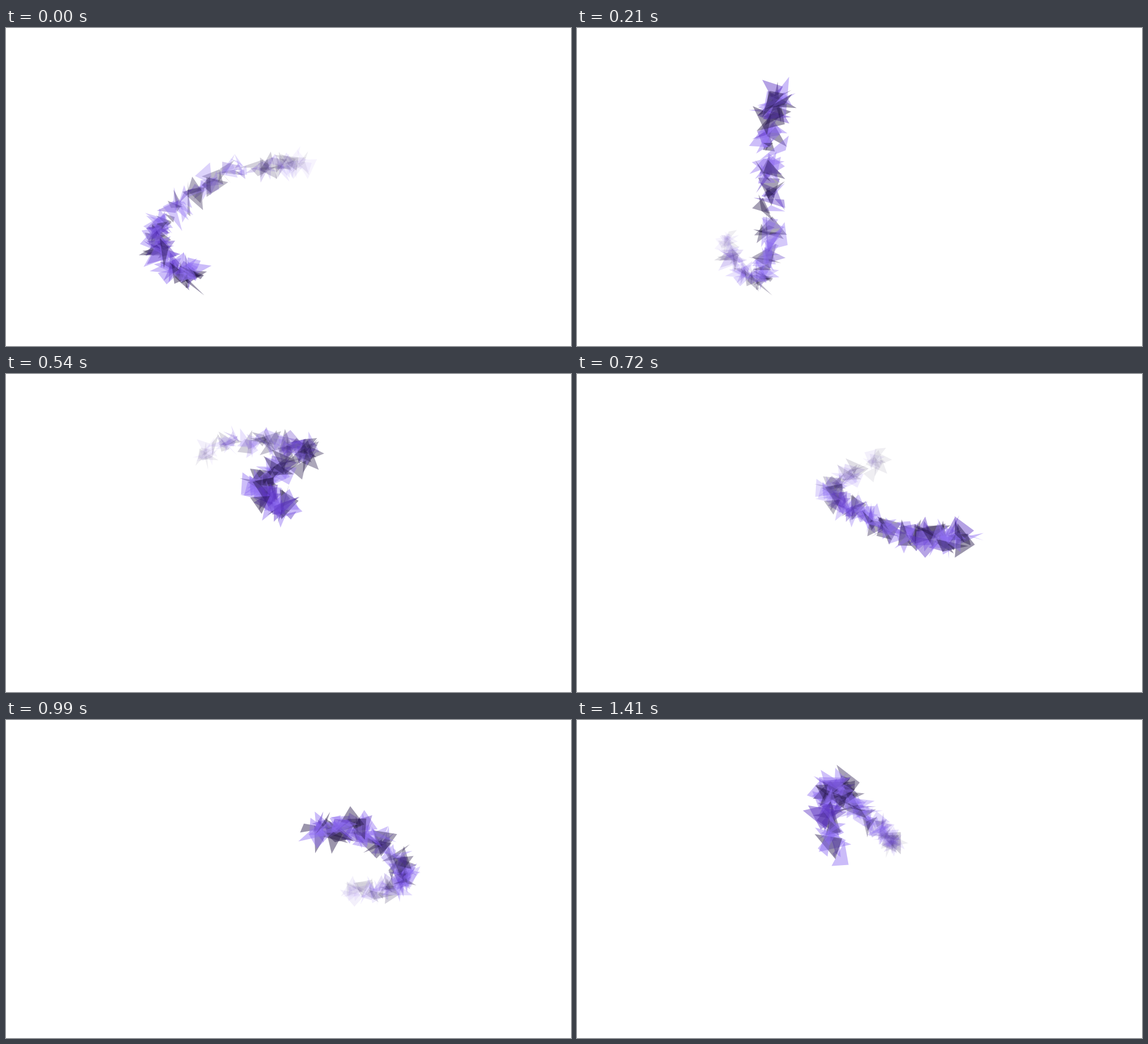
Write an HTML page with a canvas that moves like this. It is 998 px wide and 561 px high and loops after 1.44 s.

```html
<!DOCTYPE html>
<html lang="en">
<head>
<meta charset="utf-8">
<title>Shard trail</title>
<style>
  html, body { margin: 0; width: 100%; height: 100%; overflow: hidden; background: #fff; }
  canvas { display: block; width: 998px; height: 561px; }
</style>
</head>
<body>
<canvas id="stage" width="998" height="561"></canvas>
<script>
const ctx = document.getElementById('stage').getContext('2d');
const STEP = 30, STEPS = 48, LIFE = 12;
const SHARDS = 12, GRAVITY = 0.00027, SHRINK = 0.00095, OPACITY = 0.46;
const LIGHT = '143,110,242', DEEP = '92,52,196', DARK = '38,24,74';

// Emitter path as [step, x, y]; negative steps fill the trail before the loop starts.
const keys = [
  [-12, 530, 222], [-10, 482, 232], [-8, 385, 252], [-5, 272, 343], [-3, 276, 402],
  [0, 335, 429], [4, 338, 229], [7, 362, 118], [12, 535, 132], [15, 448, 192],
  [19, 525, 260], [22, 625, 287], [26, 708, 268], [30, 628, 193], [33, 550, 196],
  [37, 556, 201], [41, 488, 145], [43, 457, 114], [45, 442, 147], [47, 457, 235]
];

function slope(i, axis) {
  const a = keys[Math.max(i - 1, 0)], b = keys[Math.min(i + 1, keys.length - 1)];
  return (b[axis] - a[axis]) / (b[0] - a[0]);
}

// Cubic Hermite interpolation through the keys.
function emitter(step) {
  const s = Math.max(step, keys[0][0]);
  const i = Math.max(keys.findIndex(key => key[0] >= s), 1);
  const a = keys[i - 1], b = keys[i];
  const span = b[0] - a[0], u = (s - a[0]) / span;
  const ease = u * u * (3 - 2 * u);
  return [1, 2].map(axis =>
    a[axis] + (b[axis] - a[axis]) * ease +
    span * u * (1 - u) * ((1 - u) * slope(i - 1, axis) - u * slope(i, axis)));
}

function seeded(seed) {
  let a = seed * 7919 + 17;
  return () => {
    a = (a + 0x6D2B79F5) | 0;
    let x = Math.imul(a ^ (a >>> 15), 1 | a);
    x = (x + Math.imul(x ^ (x >>> 7), 61 | x)) ^ x;
    return ((x ^ (x >>> 14)) >>> 0) / 4294967296;
  };
}

function makeShard(step, random) {
  const [x, y] = emitter(step - random() * 0.7);
  const turn = random() * Math.PI * 2;
  const pick = random();
  const corners = [0, 1, 2].map(k => {
    const angle = turn + k * Math.PI * 2 / 3 + (random() - 0.5) * 2;
    const radius = 4 + 38 * random();
    return [Math.cos(angle) * radius, Math.sin(angle) * radius];
  });
  return {
    x: x + (random() - 0.5) * 8,
    y: y + (random() - 0.5) * 8,
    color: pick < 0.5 ? LIGHT : pick < 0.68 ? DEEP : DARK,
    corners
  };
}

const bursts = Array.from({ length: STEPS + LIFE }, (_, i) => {
  const random = seeded(i + 1);
  return Array.from({ length: SHARDS }, () => makeShard(i - LIFE, random));
});

function drawShard(shard, age) {
  const scale = 1 - SHRINK * age;
  const y = shard.y + GRAVITY * age * age / 2;
  const alpha = OPACITY * (1 - (age / (LIFE * STEP)) ** 2);
  ctx.fillStyle = `rgba(${shard.color},${alpha})`;
  ctx.beginPath();
  for (const [dx, dy] of shard.corners) ctx.lineTo(shard.x + dx * scale, y + dy * scale);
  ctx.fill();
}

function render(now) {
  const head = Math.floor(now / STEP) % STEPS + LIFE;
  ctx.clearRect(0, 0, 998, 561);
  for (let i = head - LIFE + 1; i <= head; i++) {
    for (const shard of bursts[i]) drawShard(shard, (head - i) * STEP);
  }
}

let start;
function tick(now) {
  start ??= now;
  render(now - start);
  requestAnimationFrame(tick);
}
render(0);
requestAnimationFrame(tick);
</script>
</body>
</html>
```
